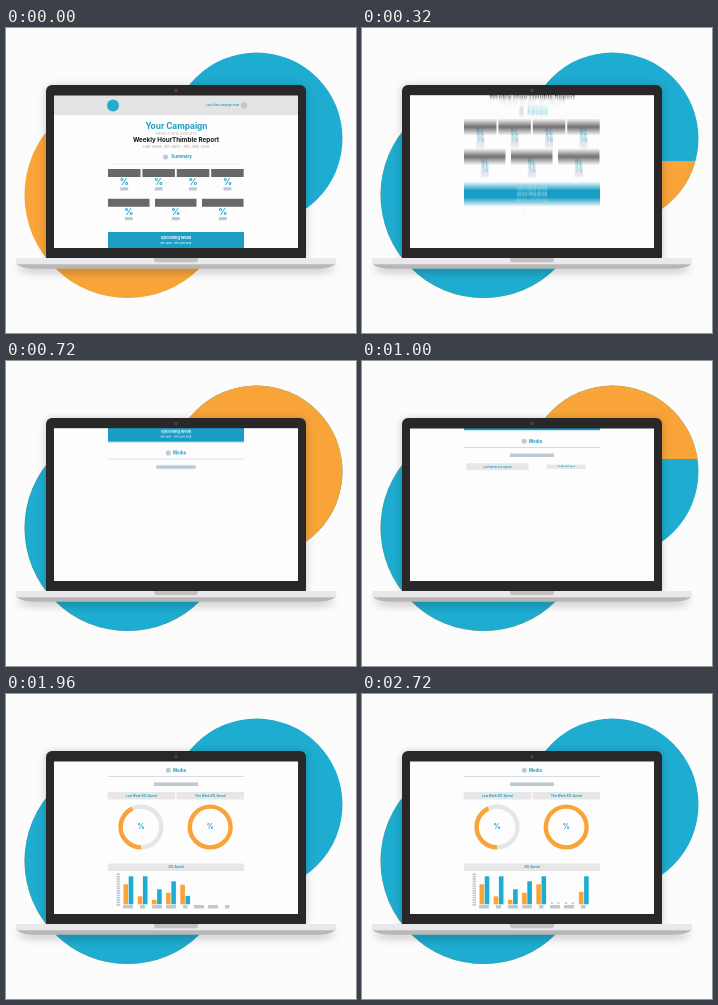
An HTML page with a canvas that plays this animation: 350 px wide and 305 px high, repeating every 2.76 s.

```html
<!DOCTYPE html>
<html lang="en">
<head>
<meta charset="utf-8">
<title>Weekly report on a laptop</title>
<style>
html, body { margin: 0; width: 100%; height: 100%; overflow: hidden; background: #fcfcfc; }
canvas { display: block; width: 350px; height: 305px; }
</style>
</head>
<body>
<canvas id="stage" width="350" height="305"></canvas>
<script>
const LOOP = 2760, STEP = 40, W = 350, H = 305;
const BLUE = '#1eacd0', ORANGE = '#f8a439', INK = '#189fc5', PILL = '#bdc9d0', PANEL = '#e7e7e7';
const SCREEN = { x: 48, y: 67.5, w: 244, h: 152.5 };

const ctx = document.getElementById('stage').getContext('2d');
const layer = document.createElement('canvas');
layer.width = W;
layer.height = H;
const page = layer.getContext('2d');

const progress = (t, start, length) => Math.min(1, Math.max(0, (t - start) / length));
const smooth = p => p * p * (3 - 2 * p);
const easeOut = p => 1 - (1 - p) ** 3;

// Scroll keys: time, offset, speed
const scrollKeys = [[100, 0, 0], [320, 46, .45], [520, 112, .2], [1000, 151, .02], [1300, 155, 0]];

function scrollAt(t) {
  if (t <= scrollKeys[0][0]) return 0;
  for (let i = 1; i < scrollKeys.length; i++) {
    const [t0, y0, v0] = scrollKeys[i - 1], [t1, y1, v1] = scrollKeys[i];
    if (t > t1) continue;
    const d = t1 - t0, p = (t - t0) / d, q = 1 - p;
    return y0 * (1 + 2 * p) * q * q + v0 * d * p * q * q
      + y1 * p * p * (3 - 2 * p) - v1 * d * p * p * q;
  }
  return 155;
}

function box(c, x, y, w, h, fill, r = 0) {
  c.fillStyle = fill;
  c.beginPath();
  c.roundRect(x, y, w, h, r);
  c.fill();
}

function dot(c, x, y, r, fill) {
  c.fillStyle = fill;
  c.beginPath();
  c.arc(x, y, r, 0, Math.PI * 2);
  c.fill();
}

function label(text, x, y, size, fill, weight = 700, align = 'center') {
  page.font = `${weight} ${size}px Inter, sans-serif`;
  page.fillStyle = fill;
  page.textAlign = align;
  page.textBaseline = 'middle';
  page.fillText(text, x, y);
}

function scaled(x, y, s, draw) {
  if (s <= 0) return;
  page.save();
  page.translate(x, y);
  page.scale(s, s);
  draw();
  page.restore();
}

// Angles in degrees, clockwise from the top
function ring(x, y, from, to, color) {
  if (from >= to) return;
  const rad = a => (a - 90) * Math.PI / 180;
  page.strokeStyle = color;
  page.lineWidth = 4.4;
  page.beginPath();
  page.arc(x, y, 20.4, rad(from), rad(to));
  page.stroke();
}

function tile(x, y, w) {
  const mid = x + w / 2;
  box(page, x, y, w, 8, '#686868');
  label('%', mid, y + 13.4, 9, INK);
  box(page, mid - 4, y + 18.2, 8, 3.4, PILL, .7);
}

function summary() {
  box(page, 48, 60, 244, 27, '#e3e3e3');
  dot(page, 107, 77.5, 6, BLUE);
  label('Ask to find Campaign Team', 233, 77.5, 2.5, INK, 600, 'right');
  dot(page, 238, 77.5, 3.2, PILL);
  label('Your Campaign', 170.5, 99, 8.3, INK);
  label('WEEKLY DATA INSIGHTS', 170, 106.3, 3.5, '#b5b5b5', 400);
  label('Weekly HourThimble Report', 170, 112.3, 6.3, '#161616');
  label('Last Week: 4th June - 8th June 2018', 170, 118.5, 3.8, '#a9a9a9', 400);
  dot(page, 159.5, 129, 2.5, PILL);
  label('Summary', 165.3, 129, 4.4, INK, 700, 'left');
  box(page, 102, 135.7, 136, .5, '#e4e8ec');
  for (let i = 0; i < 4; i++) tile(102 + i * 34.4, 141, 32.5);
  for (let i = 0; i < 3; i++) tile(102 + i * 47, 170.7, 41.5);
  box(page, 102, 204, 136, 16.2, '#1b9fc6');
  label('Upcoming Week', 170, 210, 3.8, '#fff');
  label('9th June - 17th June 2018', 170, 215.2, 2.5, '#fff', 500);
}

function panel(text, x, y, w, s) {
  scaled(x, y, s, () => {
    box(page, -w / 2, -3.8, w, 7.6, PANEL);
    label(text, 0, .1, 2.9, INK);
  });
}

function chart(t) {
  const slide = smooth(progress(t, 1160, 520));
  for (let i = 0; i < 14; i++) {
    const in_ = easeOut(progress(t, 1080 + i * 12, 360));
    if (in_ > 0) box(page, 110.5 - 3 * (1 - in_) * (13 - i) / 13, 334.5 + i * 2.35, 3.6, 1.6, PILL, .4);
  }

  page.save();
  page.beginPath();
  page.rect(109, 360, 130, 12);
  page.clip();
  const shown = progress(t, 1120, 160);
  page.globalAlpha = shown;
  [[117, 10], [134, 5], [146, 10], [160, 10], [177, 4.5], [188, 10], [202, 10], [219, 4.5]]
    .forEach(([x, w], i) => box(page, x - (1 - slide) * (35 - i * 1.7), 366, w, 3.5, PILL, .6));
  page.restore();

  const heights = [20, 28, 8, 28, 4.5, 15, 11.5, 23, 20, 28, 0, 0, 0, 0, 12.5, 28];
  heights.forEach((h, i) => {
    const p = smooth(progress(t, 1380 + i * 60, 110));
    const x = 117.5 + (i >> 1) * 14.2 + (i % 2) * 5.2;
    if (!p) return;
    if (h) box(page, x, 365.3 - h * p, 4.6, h * p, i % 2 ? BLUE : ORANGE);
    else box(page, x + .4 + (i % 2) * 1.2, 363.2, 2.2, 1.8 * p, PILL, .5);
  });
}

function media(t) {
  const head = easeOut(progress(t, 290, 270));
  scaled(162.3, 231.3, head, () => dot(page, 0, 0, 2.5, PILL));
  scaled(173.5, 231.3, easeOut(progress(t, 360, 260)), () => label('Media', 0, 0, 4.3, INK));

  const line = smooth(progress(t, 400, 290));
  box(page, 170 - 68 * line, 237.2, 136 * line, .7, '#c5d3df');
  const strip = easeOut(progress(t, 540, 340));
  box(page, 170 - 22 * strip, 243.6, 44 * strip, 3.5, PILL);

  panel('Last Week ATL Spend', 135.4, 256.7, 67.5, easeOut(progress(t, 760, 420)));
  panel('This Week ATL Spend', 204.3, 256.7, 67.5, easeOut(progress(t, 890, 440)));

  const first = smooth(progress(t, 1000, 480));
  if (first) {
    ring(135, 288, 180 - 205 * first, 180, '#e6e6e6');
    ring(135, 288, 335 - 155 * first, 335, ORANGE);
  }
  const second = smooth(progress(t, 1080, 530));
  if (second) ring(204.2, 288, 360 - 360 * second, 360, ORANGE);
  scaled(135, 288, easeOut(progress(t, 1000, 260)), () => label('%', 0, 0, 7, INK));
  scaled(204.2, 288, easeOut(progress(t, 1080, 240)), () => label('%', 0, 0, 7, INK));

  panel('ATL Spend', 170, 328.3, 136, easeOut(progress(t, 1230, 400)));
  chart(t);
}

function drawPage(t, scroll) {
  page.setTransform(1, 0, 0, 1, 0, 0);
  page.fillStyle = '#fdfdfe';
  page.fillRect(0, 0, W, H);
  page.translate(0, -scroll);
  summary();
  media(t);
}

function wipedCircle(x, y, r, from, to, edge) {
  dot(ctx, x, y, r, from);
  ctx.save();
  ctx.beginPath();
  ctx.rect(0, edge, W, H);
  ctx.clip();
  dot(ctx, x, y, r, to);
  ctx.restore();
}

function shadow(color, blur, y, draw) {
  ctx.save();
  ctx.shadowColor = color;
  ctx.shadowBlur = blur;
  ctx.shadowOffsetY = y;
  draw();
  ctx.restore();
}

function baseEdge() {
  ctx.beginPath();
  ctx.moveTo(10, 235.5);
  ctx.lineTo(330, 235.5);
  ctx.quadraticCurveTo(325, 240.8, 310, 240.8);
  ctx.lineTo(30, 240.8);
  ctx.quadraticCurveTo(15, 240.8, 10, 235.5);
  ctx.fillStyle = '#b9b7b5';
  ctx.fill();
}

function laptop() {
  shadow('rgba(0,0,0,.22)', 9, 1, () => box(ctx, 40, 57, 260, 174, '#292728', [6, 6, 2, 2]));
  shadow('rgba(0,0,0,.3)', 8, 3, baseEdge);
  box(ctx, 10, 230, 320, 6.3, '#e9e9ed', [1, 1, 2, 2]);
  box(ctx, 148, 230, 44, 4.2, '#c3c1bf', [0, 0, 3, 3]);
  dot(ctx, 170, 62.6, 1.5, '#555');
  dot(ctx, 170, 62.6, .7, '#222');
}

function render(t) {
  ctx.fillStyle = '#fcfcfc';
  ctx.fillRect(0, 0, W, H);
  wipedCircle(250.5, 110.5, 86, BLUE, ORANGE, 293 - t / 2);
  wipedCircle(121.5, 167, 103, ORANGE, BLUE, 270 - 206 * progress(t, 0, 260));
  laptop();

  ctx.save();
  ctx.beginPath();
  ctx.rect(SCREEN.x, SCREEN.y, SCREEN.w, SCREEN.h);
  ctx.clip();
  // Average several scroll positions for motion blur
  const travel = scrollAt(t + 9) - scrollAt(t - 9);
  const samples = travel > .6 ? 8 : 1;
  for (let i = 0; i < samples; i++) {
    const shift = samples > 1 ? (i / (samples - 1) - .5) * travel : 0;
    drawPage(t, scrollAt(t) + shift);
    ctx.globalAlpha = 1 / (i + 1);
    ctx.drawImage(layer, 0, 0);
  }
  ctx.restore();
}

const began = performance.now();
function tick() {
  const t = (performance.now() - began) % LOOP;
  render(Math.floor(t / STEP) * STEP);
  requestAnimationFrame(tick);
}
tick();
</script>
</body>
</html>
```
